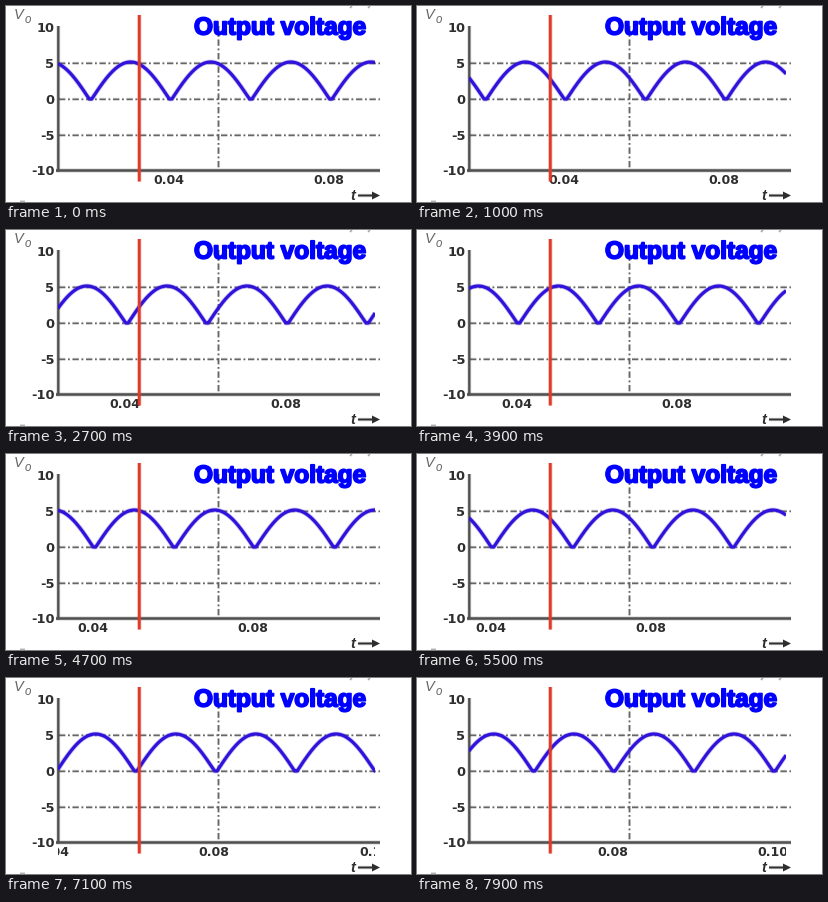
A matplotlib script that plays this animation: 405x196 px, repeating every 8000 ms.

```python
import numpy as np
import matplotlib.pyplot as plt
from matplotlib.animation import FuncAnimation
from matplotlib.patheffects import withStroke

W, H, DPI = 405, 196, 64
PT = 72 / DPI                     # points per pixel
FRAMES, STEP = 80, 100
LEFT, RIGHT = 52, 369             # window the signal scrolls through
HUMP, SPEED = 80.1, 1.62          # px per half wave, px per frame
START = 164.6                     # zero crossing at t = 0.04
ZERO, AMP, DROP = 93, 37, 0.05    # DROP flattens the foot of each hump
INK, AXIS, GRID = "#2e2e2e", "#505050", "#666666"
BLUE, RED, TITLE = "#3013da", "#e03a28", "#0000ff"

plt.rcParams["font.family"] = "DejaVu Sans"
fig = plt.figure(figsize=(W / DPI, H / DPI), dpi=DPI, facecolor="white")


def layer(x0, x1, z):
    """Transparent axes over columns x0..x1, in pixel units with y down."""
    ax = fig.add_axes([x0 / W, 0, (x1 - x0) / W, 1], zorder=z)
    ax.set_xlim(x0, x1)
    ax.set_ylim(H, 0)
    ax.axis("off")
    return ax


def line(ax, xs, ys, color, width, **kw):
    """Line with a faint halo, for a soft video-like edge."""
    kw.setdefault("solid_capstyle", "butt")
    halo = withStroke(linewidth=(width + 1.6) * PT, foreground=color, alpha=0.25)
    return ax.plot(xs, ys, color=color, lw=width * PT, snap=False,
                   path_effects=[halo], **kw)[0]


def label(ax, x, y, s, size, color=INK, **kw):
    return ax.text(x, y, s, fontsize=size * PT, color=color, **kw)


back, scroll, front = layer(0, W, 1), layer(LEFT, RIGHT, 2), layer(0, W, 3)

# grid and axes
dashes = (0, (4.2, 1.8, 1.2, 1.8))
for y in (57.3, 93.3, 129.3):
    line(back, [53, 374], [y, y], GRID, 1.5, ls=dashes)
line(back, [212.5, 212.5], [20, 164], GRID, 1.5, ls=dashes)
line(back, [52.3, 52.3], [20, 165.5], AXIS, 2.3)
line(back, [50, 374], [164.5, 164.5], AXIS, 2.5)

for value, y in ((10, 21), (5, 57), (0, 93), (-5, 129), (-10, 164)):
    label(back, 48.5, y + 5, str(value).replace("\u2212", "-"), 13,
          ha="right", weight="bold")

label(back, 8, 13, "V", 14.5, "#666666", style="italic",
      family="Liberation Sans")
label(back, 18.5, 17, "o", 11.5, "#666666", style="italic",
      family="Liberation Sans")
label(back, 344, 194, "t", 14.5, style="italic", weight="bold",
      family="Liberation Sans")
line(back, [352, 368], [189.5, 189.5], INK, 1.8)
back.fill([366, 374, 366], [185.5, 189.5, 193.5], color=INK, lw=0)

# edges of neighbouring text cut off by the frame
for x in (344, 362):
    line(back, [x, x + 2], [2, 0], "#999999", 1)
line(back, [14, 19], [195.3, 195.3], "#aaaaaa", 1)

# scrolling signal and time labels
xs = np.linspace(LEFT - 4, RIGHT + 4, 1500)
wave = line(scroll, xs, xs * 0, BLUE, 3.2, solid_joinstyle="round")
ticks = [label(scroll, 0, 178, s, 12.5, ha="center", weight="bold",
               clip_on=True) for s in ("0.04", "0.08", "0.10")]

# marker and heading
line(front, [133.3, 133.3], [9, 175.5], RED, 2.8)
label(front, 188, 28.5, "Output voltage", 24.4, TITLE, weight="bold",
      family="Liberation Sans",
      path_effects=[withStroke(linewidth=1.8 * PT, foreground=TITLE)])


def draw(i):
    x0 = START - SPEED * i
    hump = np.abs(np.sin(np.pi * (xs - x0) / HUMP))
    wave.set_ydata(ZERO - AMP * np.maximum(hump - DROP, 0) / (1 - DROP))
    for k, tick in enumerate(ticks):
        tick.set_x(x0 - 1.5 + 2 * HUMP * k)
    return [wave, *ticks]


anim = FuncAnimation(fig, draw, frames=FRAMES, interval=STEP,
                     init_func=lambda: draw(0), repeat=True, repeat_delay=0)
plt.show()
```
